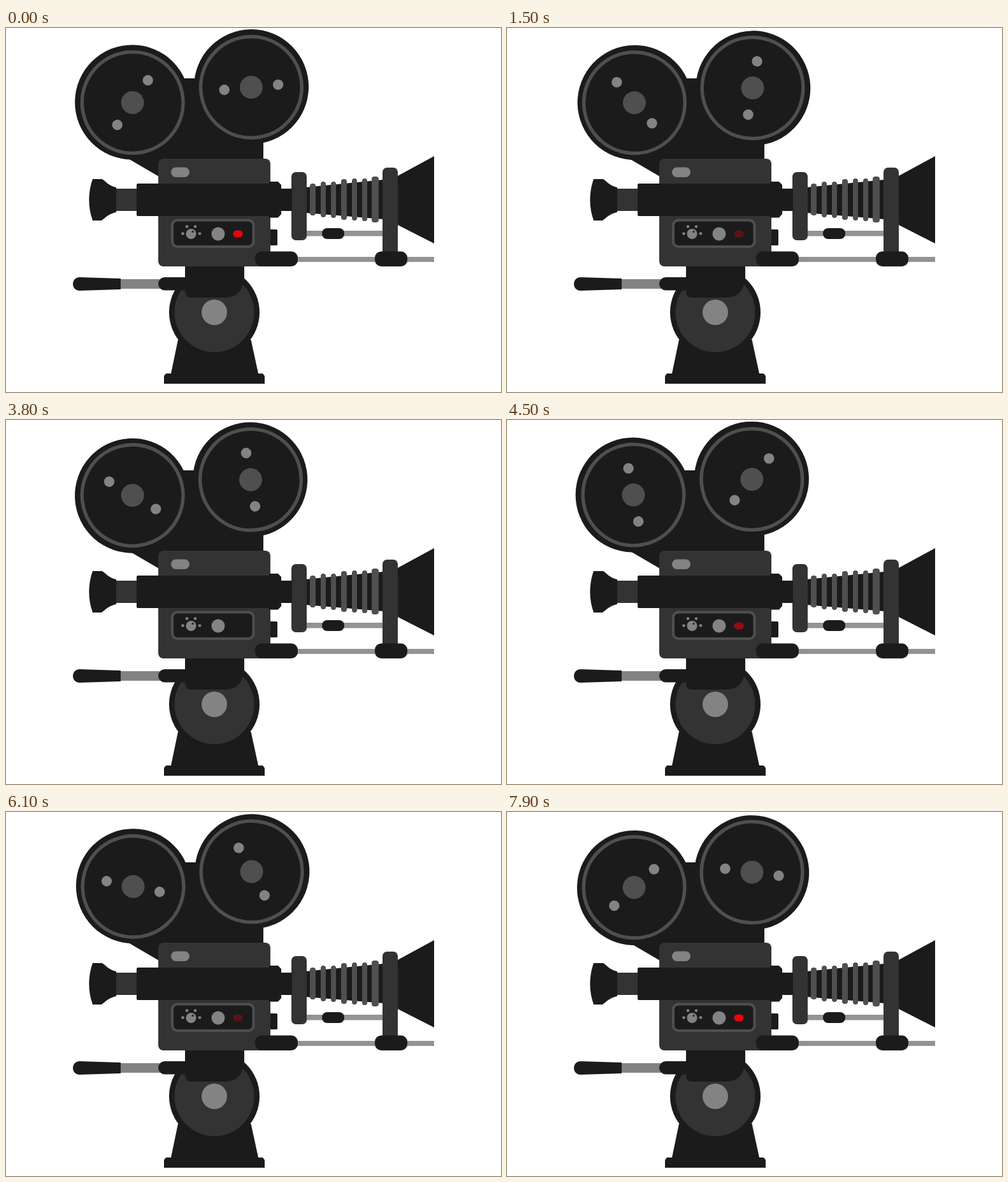
Write an HTML page that moves like this. It is 777 px wide and 571 px high and loops after 8000 ms.

```html
<!DOCTYPE html>
<html lang="en">
<head>
<meta charset="utf-8">
<title>Film camera</title>
<style>
  html, body { margin: 0; width: 100%; height: 100%; overflow: hidden; background: #fff; }
  svg { display: block; width: 777px; height: 571px; }
  .black { fill: #1b1b1b; }
  .dark { fill: #333; }
  .mid { fill: #4f4f4f; }
  .light { fill: #838383; }
  .rod { fill: #939393; }
  .ring { fill: none; stroke: #4f4f4f; stroke-width: 5.5; }
</style>
</head>
<body>
<svg viewBox="0 0 777 571">
  <!-- magazine -->
  <path class="black" d="M265 79H340L404 120V240H252L180 198Z"/>
  <g id="reels"></g>

  <!-- tripod head and base -->
  <path class="black" d="M270 489H384.500L396 542H403L406 546V558H248V546L251 542H259Z"/>
  <circle class="black" cx="327" cy="446" r="71"/>
  <circle class="dark" cx="327" cy="446" r="62.500"/>
  <circle class="light" cx="327" cy="446" r="20"/>
  <rect class="light" x="178" y="394" width="66" height="15"/>
  <path class="black" d="M180 393L116 391C101.500 390.500 101.500 412.500 116 412L180 410Z"/>
  <rect class="black" x="239" y="391" width="60" height="20.500" rx="10"/>
  <path class="black" d="M281 370H374V394Q370 423 343 423H291Q281 423 281 413Z"/>

  <!-- lens rods and bellows -->
  <rect class="rod" x="450" y="359" width="222" height="8"/>
  <rect class="rod" x="470" y="318" width="124" height="8.500"/>
  <rect class="black" x="496" y="314" width="35" height="17" rx="8"/>
  <path class="black" d="M470 250L592 238V300L470 290Z"/>
  <g id="ribs" class="mid"></g>
  <path class="black" d="M613 233L672 201V338L613 308Z"/>
  <rect class="dark" x="448" y="226" width="24" height="107" rx="7"/>
  <rect class="dark" x="591" y="219" width="24" height="145" rx="7"/>
  <rect class="black" x="579" y="350.500" width="51" height="23.500" rx="10"/>

  <!-- body -->
  <rect class="black" x="408" y="316" width="18" height="25" rx="1.500"/>
  <rect class="dark" x="239" y="205" width="176" height="169" rx="8"/>
  <rect class="black" x="391" y="350.500" width="67" height="23.500" rx="10"/>
  <rect class="light" x="259" y="218.500" width="29" height="15.500" rx="7.700"/>

  <!-- viewfinder tube -->
  <rect class="dark" x="172" y="252" width="36" height="35"/>
  <path class="black" d="M136 237H151L155 240Q163 248 173 250V289Q163 291 155 298L150 302H136C128.500 281 128.500 258 136 237Z"/>
  <rect class="black" x="205" y="244" width="212" height="51" rx="2"/>
  <path class="black" d="M413 241H427L432 246V252H449V287H432V292L427 297.500H413Z"/>

  <!-- control panel -->
  <rect x="261" y="301.500" width="127.500" height="41.500" rx="8" fill="#1b1b1b" stroke="#4f4f4f" stroke-width="4"/>
  <g class="light">
    <circle cx="290.500" cy="323" r="8"/>
    <circle cx="277.500" cy="322.500" r="2.300"/>
    <circle cx="284" cy="311.500" r="2.300"/>
    <circle cx="297" cy="311.500" r="2.300"/>
    <circle cx="304" cy="322.500" r="2.300"/>
    <circle cx="333" cy="323" r="10.500"/>
  </g>
  <circle class="black" cx="293" cy="319.500" r="1.500"/>
  <rect id="lamp" x="356.500" y="317.500" width="15" height="11" rx="5.300" fill="#e60510"/>
</svg>
<script>
  const LOOP = 8000, STEP = 100;
  const SPIN = 0.07;          // degrees per ms
  const BLINK = 360 / SPIN / 2;
  const NS = "http://www.w3.org/2000/svg";

  function add(parent, tag, attrs) {
    const el = parent.appendChild(document.createElementNS(NS, tag));
    for (const key in attrs) el.setAttribute(key, attrs[key]);
    return el;
  }

  // Ribs: centre x, top, bottom, width
  const ribs = [
    [481.5, 244, 294, 9], [498, 241, 297, 8], [514, 241, 298, 8], [530.5, 237, 301, 9],
    [547, 236, 302, 8], [563, 236, 303, 8], [579.5, 233, 305, 11]
  ];
  for (const [x, top, bottom, w] of ribs) {
    add(document.getElementById("ribs"), "rect",
      { x: x - w / 2, y: top, width: w, height: bottom - top, rx: 4 });
  }

  // Each reel sits slightly off its axle, so it wobbles as it turns.
  const TILT = -75 * Math.PI / 180;
  function makeReel(x, y, start) {
    const g = add(document.getElementById("reels"), "g", {});
    const disc = (cls, r, off, dx = 0) => add(g, "circle", {
      class: cls, r, cx: off * Math.cos(TILT) + dx, cy: off * Math.sin(TILT)
    });
    disc("black", 90, 1.6);
    disc("ring", 79.3, 0.8);
    disc("mid", 18, 0.8);
    disc("light", 8.2, 0.8, -42.4);
    disc("light", 8.2, 0.8, 42.4);
    return { g, x, y, start };
  }
  const reels = [makeReel(199.2, 117.6, -55.6), makeReel(384.8, 93.7, -5.5)];
  const lamp = document.getElementById("lamp");

  // The lamp fades through four flat levels.
  function lampLevel(t) {
    const glow = Math.abs(1 - 2 * (t % BLINK) / BLINK);
    return glow > 0.79 ? 1 : glow > 0.445 ? 0.58 : glow > 0.155 ? 0.31 : 0;
  }

  function draw(t) {
    for (const { g, x, y, start } of reels) {
      g.setAttribute("transform", `translate(${x} ${y}) rotate(${start + SPIN * t})`);
    }
    lamp.setAttribute("opacity", lampLevel(t));
  }

  const begin = performance.now();
  function tick() {
    const t = (performance.now() - begin) % LOOP;
    draw(Math.floor(t / STEP) * STEP);
    requestAnimationFrame(tick);
  }
  draw(0);
  requestAnimationFrame(tick);
</script>
</body>
</html>
```
